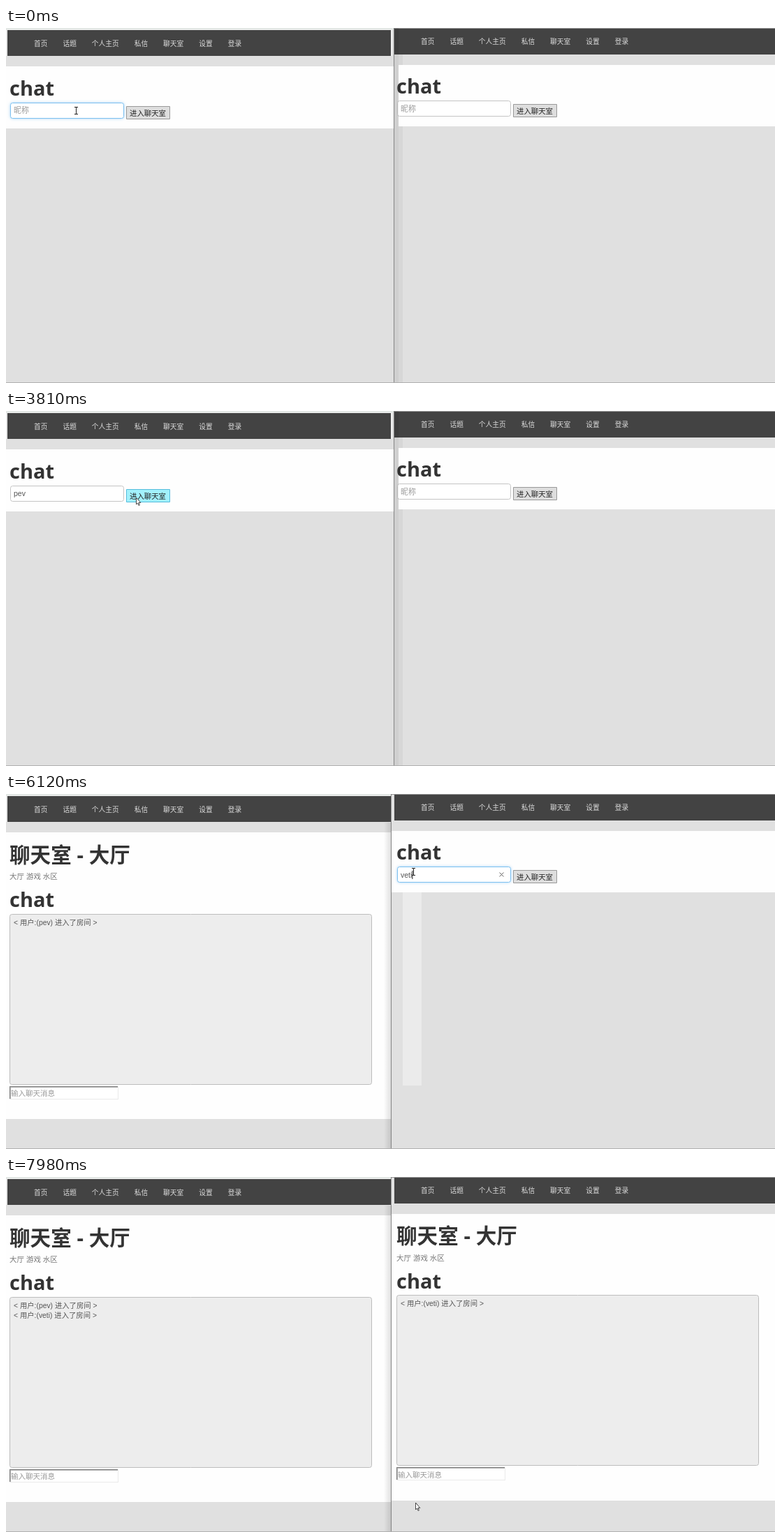
An HTML page with a canvas for the animation above (8000 ms loop, 1101 by 509 pixels).

```html
<!DOCTYPE html>
<html lang="zh">
<head>
<meta charset="utf-8">
<style>
  html, body { margin: 0; width: 100%; height: 100%; overflow: hidden; background: #e0e0e0; }
  canvas { display: block; }
</style>
</head>
<body>
<canvas id="stage" width="1101" height="509"></canvas>
<script>
const ctx = document.getElementById('stage').getContext('2d');
const CJK = '"Noto Sans CJK SC", "Noto Sans CJK", sans-serif';
const SANS = '"Liberation Sans", ' + CJK;
const HEAD = '"Noto Sans", ' + CJK;
const LOOP = 8000;
const RIGHT = { x: 554, y: -2.5 };
const MENU = ['首页', '话题', '个人主页', '私信', '聊天室', '设置', '登录'];
const NAMES = ['pev', 'veti'];
const FIELD = { x: 6, y: 107, w: 163, h: 23 };
const BUTTON = { x: 172, y: 112, w: 63, h: 19 };
const MOVES = [
  { start: 2810, end: 3370, x: 186, y: 124 },
  { start: 3930, end: 4370, x: 599, y: 108 },
  { start: 4670, end: 5010, x: 583, y: 111 },
  { start: 6120, end: 6370, x: 732, y: 123 },
  { start: 7380, end: 7980, x: 586, y: 467 }
];
let ox = 0, oy = 0;

const within = (t, a, b) => t >= a && t < b;
const typedAt = (name, t, start, pace) => name.slice(0, Math.max(0, Math.floor((t - start) / pace) + 1));
const hits = (p, r, o) => within(p.x - o.x, r.x, r.x + r.w) && within(p.y - o.y, r.y, r.y + r.h);

function rect(x, y, w, h, color) {
  const top = Math.round(y + oy);
  ctx.fillStyle = color;
  ctx.fillRect(x + ox, top, w, Math.round(y + h + oy) - top);
}

function box({ x, y, w, h }, radius, fill, stroke, line = 1) {
  ctx.beginPath();
  ctx.roundRect(x + ox + .5, Math.floor(y + oy) + .5, w - 1, h - 1, radius);
  ctx.fillStyle = fill;
  ctx.fill();
  ctx.shadowBlur = 0;
  ctx.strokeStyle = stroke;
  ctx.lineWidth = line;
  ctx.stroke();
}

function text(s, x, y, size, color, font = SANS, weight = '') {
  ctx.font = `${weight} ${size}px ${font}`;
  ctx.fillStyle = color;
  ctx.fillText(s, x + ox, y + oy);
}

const heading = (s, y, size = 29) => text(s, 5, y, size, '#333', HEAD, 'bold');

function clearMark(x, y, r) {
  ctx.strokeStyle = '#666';
  ctx.lineWidth = 1;
  ctx.beginPath();
  for (const d of [-r, r]) {
    ctx.moveTo(x + ox - r, y + oy - d);
    ctx.lineTo(x + ox + r, y + oy + d);
  }
  ctx.stroke();
}

function loginPage(s) {
  heading('chat', 96.5);
  if (s.focus) { ctx.shadowColor = 'rgba(82,168,236,.6)'; ctx.shadowBlur = 4; }
  box(FIELD, 3, '#fff', s.focus ? '#7cc0f0' : '#c4c4c4');
  if (s.typed) text(s.typed, 11, 122, 10.5, '#555');
  else text('昵称', 11, 122, 10.9, '#999');
  if (s.caret) rect(11 + (s.typed ? ctx.measureText(s.typed).width : 0), 112, 1, 12, '#222');
  if (s.focus && s.typed) clearMark(155.5, 118, 3);
  box(BUTTON, 0, s.hover ? '#a2f1fc' : '#dedede', s.hover ? '#55bcdc' : '#999');
  text('进入聊天室', 177, 125.6, 10.4, '#222');
}

function roomPage(s) {
  heading('聊天室 - 大厅', 97.5, 29.6);
  text('大厅 游戏 水区', 5, 122.4, 10.5, '#777');
  heading('chat', 162);
  box({ x: 5, y: 172, w: 519, h: 245 }, 3, '#ededed', '#bdbdbd');
  s.members.forEach((name, i) => text(`< 用户:(${name}) 进入了房间 >`, 11, 187.7 + i * 14.7, 10.35, '#555'));
  rect(5, 418.5, 156, 19, '#eaeaea');
  rect(5, 418.5, 155, 18, '#7c7c7c');
  rect(6, 419.5, 154, 17, '#b4b4b4');
  rect(7, 420.5, 153, 16, '#fff');
  text('输入聊天消息', 7, 433, 10.5, '#999');
}

function page(s) {
  rect(0, 40, 555, 15, '#e0e0e0');
  rect(2, 3, s.navWidth, 37, '#434343');
  let x = 40;
  for (const label of MENU) {
    text(label, x, 25.8, 9.75, '#dcdcdc');
    x += ctx.measureText(label).width + 21.9;
  }
  rect(s.whiteX, 55, 560, s.joined ? 411 : 88.5, '#fefefe');
  (s.joined ? roomPage : loginPage)(s);
}

function pointerAt(t) {
  const p = { x: 100, y: 118 };
  for (const { start, end, x, y } of MOVES) {
    const k = Math.min(1, Math.max(0, (t - start) / (end - start)));
    const ease = k * k * (3 - 2 * k);
    p.x += (x - p.x) * ease;
    p.y += (y - p.y) * ease;
  }
  return p;
}

const SHAPES = {
  beam() {
    ctx.fillStyle = '#222';
    ctx.fillRect(0, -5, 1, 11);
    for (const y of [-5, 5]) ctx.fillRect(-2, y, 5, 1);
  },
  hand() {
    ctx.beginPath();
    ctx.roundRect(-3, 6, 9, 8, 3);
    ctx.stroke();
    ctx.fill();
    ctx.beginPath();
    ctx.roundRect(-.5, 0, 2, 9, 1);
    ctx.stroke();
    ctx.fill();
  },
  arrow() {
    const outline = new Path2D('M.5 0v10l2-2 1.6 3.5 1.3-.6-1.5-3.4h2.9z');
    ctx.fill(outline);
    ctx.stroke(outline);
  }
};

function pointer({ x, y }, kind) {
  ctx.save();
  ctx.translate(Math.round(x), Math.round(y));
  ctx.fillStyle = '#fff';
  ctx.strokeStyle = '#333';
  ctx.lineWidth = .9;
  SHAPES[kind]();
  ctx.restore();
}

function pane(left, width, origin, state) {
  ctx.save();
  ctx.beginPath();
  ctx.rect(left, 0, width, 509);
  ctx.clip();
  ox = origin.x;
  oy = origin.y;
  page(state);
  ox = oy = 0;
  ctx.restore();
}

function draw(t) {
  const mouse = pointerAt(t), LEFT = { x: 0, y: 0 };
  const rightActive = t >= 4750, leftIn = t >= 3890, rightIn = t >= 7070;
  const divider = rightActive ? 551 : 555;
  const hoverL = !leftIn && hits(mouse, BUTTON, LEFT);
  const hoverR = !rightIn && hits(mouse, BUTTON, RIGHT);

  rect(0, 0, 1101, 509, '#e0e0e0');
  if (leftIn && !rightIn) rect(divider + 17, 141, 595 - divider - 17, 277, '#ebebeb');
  rect(0, 0, divider, 2, '#e3e8e5');
  rect(1, 2, 552, 39, '#eee');
  rect(divider + 1, 0, 549, 1, '#999');

  pane(0, divider, LEFT, {
    navWidth: 549, whiteX: 0, joined: leftIn, hover: hoverL, focus: t < 3530,
    typed: typedAt(NAMES[0], t, 2090, 150),
    caret: within(t, 370, 750) || within(t, 1230, 1760) || within(t, 2090, 2810),
    members: t >= 7380 ? NAMES : NAMES.slice(0, 1)
  });
  pane(divider + 1, 550, RIGHT, {
    navWidth: 560, whiteX: rightActive ? -2 : 8, joined: rightIn, hover: hoverR,
    focus: within(t, 4750, 6650), typed: typedAt(NAMES[1], t, 5170, 180),
    caret: within(t, 4850, 6250), members: NAMES.slice(1)
  });

  if (rightActive) {
    const shade = ctx.createLinearGradient(541, 0, 551, 0);
    shade.addColorStop(0, 'rgba(0,0,0,0)');
    shade.addColorStop(1, 'rgba(0,0,0,.12)');
    rect(541, 41, 10, 468, shade);
  } else {
    rect(556, 0, 6, 509, 'rgba(0,0,0,.07)');
    rect(562, 38, 6, 15, 'rgba(0,0,0,.04)');
    rect(562, 141, 6, 368, 'rgba(0,0,0,.04)');
  }
  rect(divider, 0, 1, 509, '#858585');
  rect(0, 508, 1101, 1, '#b0b0b0');

  const beam = !leftIn && hits(mouse, FIELD, LEFT) || !rightIn && hits(mouse, FIELD, RIGHT);
  const hand = hoverL && t < 3750 || hoverR;
  pointer(mouse, beam ? 'beam' : hand ? 'hand' : 'arrow');
}

function tick() {
  draw(performance.now() % LOOP);
  requestAnimationFrame(tick);
}
tick();
</script>
</body>
</html>
```
